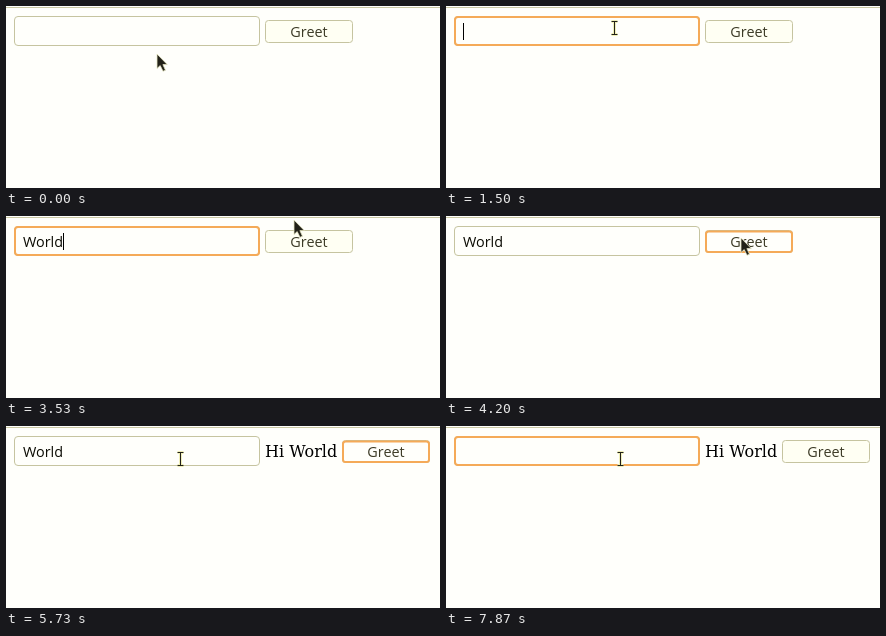
Write an HTML page that moves like this. It is 434 px wide and 182 px high and loops after 8000 ms.

```html
<!DOCTYPE html>
<html lang="en">
<head>
<meta charset="utf-8">
<title>Greet form</title>
<style>
  html, body { margin: 0; width: 100%; height: 100%; overflow: hidden; background: #fffffb; }
  svg { display: block; width: 434px; height: 182px; }
  .ui { font: 500 14.4px "Open Sans", "Noto Sans", sans-serif; }
  .box { stroke: #c6c4a0; }
  .ring { fill: #fffffb; stroke: #f5aa58; stroke-width: 2; }
</style>
</head>
<body>
<svg viewBox="0 0 434 182">
  <path d="M0 1.5H434" stroke="#cac8a4"/>
  <rect class="box" x="8.5" y="10.5" width="245" height="29" rx="3.5" fill="#fffffb"/>
  <rect id="fieldRing" class="ring" x="9" y="11" width="244" height="28" rx="3"/>
  <rect id="selection" x="17" y="16" height="19" fill="#f07746"/>
  <text id="value" class="ui" x="17" y="31"></text>
  <path id="caret" d="M.5 17V34" stroke="#000"/>
  <text id="greeting" x="259" y="31" font-size="16" font-family="DejaVu Serif, serif">Hi World</text>
  <g id="button">
    <rect class="box" x="259.5" y="14.5" width="87" height="22" rx="3" fill="#fffff3"/>
    <rect id="buttonRing" class="ring" x="260" y="15.5" width="86" height="20.5" rx="2.5"/>
    <text class="ui" x="303" y="31" text-anchor="middle" fill="#3c3a26">Greet</text>
  </g>
  <path id="arrow" d="M0 0V14.5L3.2 11.6L6 17.3L8.5 16.2L5.9 10.6H10.3Z" fill="#222118" stroke="#e8e7c4" stroke-width=".8"/>
  <g id="beam" fill="none">
    <path d="M-2.5 -6.5H3.5M.5 -6.5V6.5M-2.5 6.5H3.5" stroke="#f0efb8" stroke-width="3"/>
    <path d="M-2.5 -6.5H3.5M.5 -6.5V6.5M-2.5 6.5H3.5" stroke="#222118"/>
  </g>
</svg>
<script>
const $ = id => document.getElementById(id);
const [fieldRing, selection, value, caret, greeting, button, buttonRing, arrow, beam] =
  ['fieldRing', 'selection', 'value', 'caret', 'greeting', 'button', 'buttonRing', 'arrow', 'beam'].map($);

const LOOP = 8000, WORD = 'World';
const keys = [2185, 2400, 2500, 2610, 2715];

// Pointer stops: time, x, y
const stops = [
  [0, 151, 48], [30, 151, 48], [430, 308, 17], [830, 308, 17], [1130, 250, 50],
  [1470, 168, 22], [3170, 168, 22], [3500, 288, 4], [3560, 288, 4], [3930, 295, 22],
  [4830, 295, 22], [5080, 235, 46], [5330, 160, 44], [5530, 160, 44], [5710, 174, 33],
  [LOOP, 174, 33]
];

const show = (el, on) => el.setAttribute('visibility', on ? 'visible' : 'hidden');
const between = (t, a, b) => t >= a && t < b;

function pointer(t) {
  const i = stops.findIndex(s => s[0] > t);
  const [t0, x0, y0] = stops[i - 1], [t1, x1, y1] = stops[i];
  const p = (t - t0) / (t1 - t0), e = p * p * (3 - 2 * p);
  return [x0 + (x1 - x0) * e, y0 + (y1 - y0) * e];
}

function draw(t) {
  const [x, y] = pointer(t);
  const overField = between(x, 8, 254) && between(y, 10, 40);
  const buttonFocus = between(t, 4070, 6000);
  const fieldFocus = t >= 1400 && !buttonFocus;
  const selected = between(t, 6130, 6800);
  const greeted = t >= 4400;

  show(fieldRing, fieldFocus);
  show(buttonRing, buttonFocus);
  button.setAttribute('transform', `translate(${greeted ? 77 : 0})`);
  show(greeting, greeted);

  value.textContent = t < 6800 ? WORD.slice(0, keys.filter(k => k <= t).length) : '';
  value.setAttribute('fill', selected ? '#fff' : '#0c0c04');
  const width = value.textContent ? value.getComputedTextLength() : 0;
  selection.setAttribute('width', width);
  show(selection, selected);
  caret.setAttribute('transform', `translate(${17 + Math.round(width)})`);
  show(caret, fieldFocus && !selected && t < 7320);

  const at = `translate(${Math.round(x)} ${Math.round(y)})`;
  arrow.setAttribute('transform', at);
  beam.setAttribute('transform', at);
  show(arrow, !overField);
  show(beam, overField);
}

const start = performance.now();
function tick() {
  draw((performance.now() - start) % LOOP);
  requestAnimationFrame(tick);
}
tick();
</script>
</body>
</html>
```
